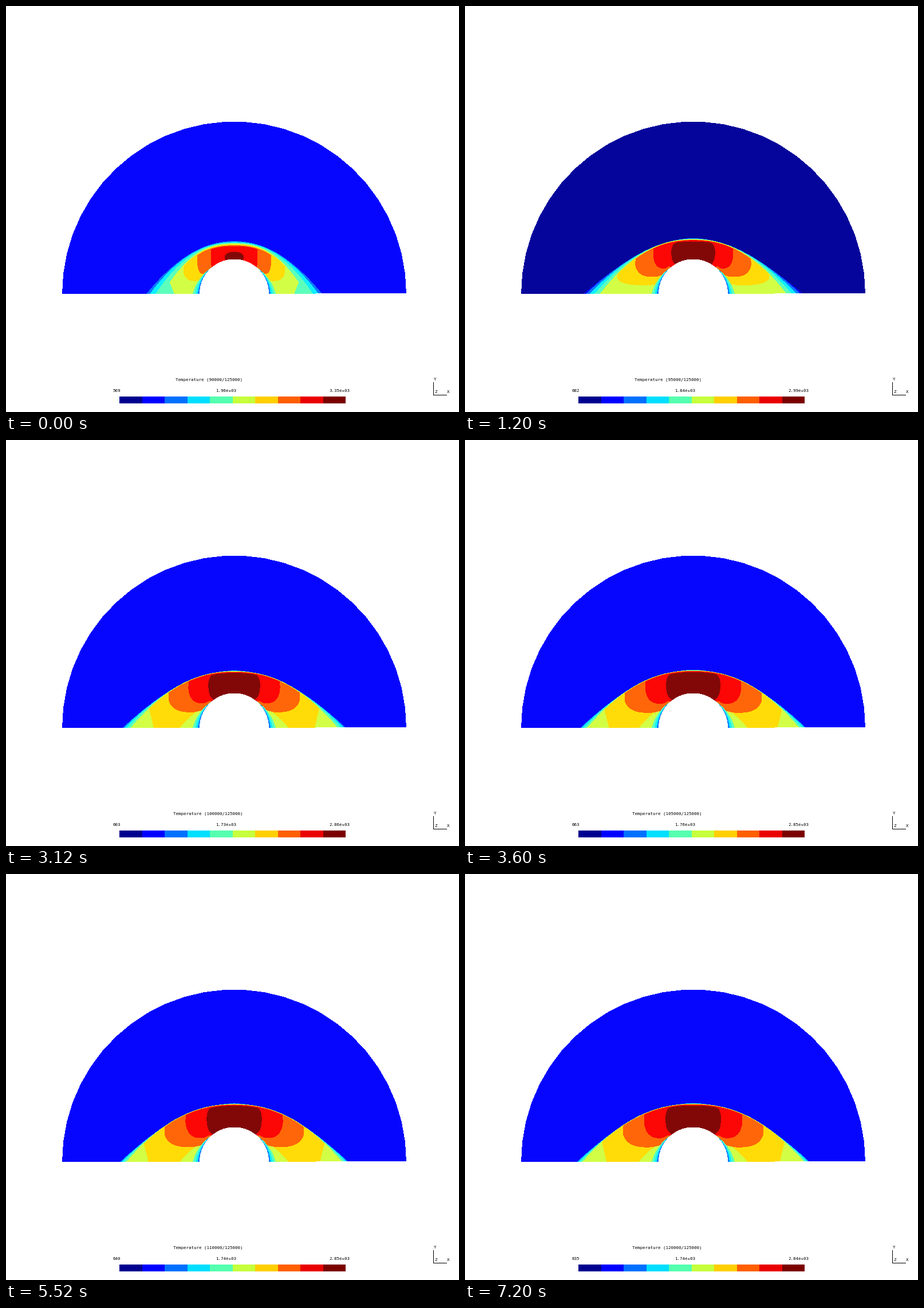
Recreate the animation shown at these times as a matplotlib script. Size 791 px wide and 708 px high, loop 8 s.

```python
import numpy as np
import matplotlib.pyplot as plt
from matplotlib.animation import FuncAnimation
from matplotlib.patches import Polygon, Rectangle

W, H, DPI = 791, 708, 100
CX, BASE = 398.5, 502
R_OUT, R_BODY = 300, 60

BAR = ["#00008f", "#0000ff", "#0070ff", "#00dfff", "#55ffaf",
       "#c6ff3c", "#ffcf00", "#ff5f00", "#ea0000", "#7a0000"]
LIT = ["#05059b", "#0606ff", "#0c78ff", "#0eeeff", "#5cffbc",
       "#d2ff46", "#ffdc08", "#ff6609", "#fc0606", "#820808"]
GREEN, YELLOW, RED, DARK = 5, 6, 8, 9

# Coldest and hottest value of each step, in kelvin
RANGES = [(569, 3350), (682, 2990), (603, 2860), (663, 2850),
          (640, 2850), (643, 2840), (635, 2840)]
AMBIENT = 900   # temperature of the undisturbed flow
GROUND = 2000   # colours below this reach the base line

# Lower side of a lobe, from its tip (0, 0) towards the wall
LOBE = [(0, 0), (0, .42), (.12, .78), (.34, .97), (.64, 1), (.88, .88)]

fig = plt.figure(figsize=(W / DPI, H / DPI), dpi=DPI, facecolor="white")
ax = fig.add_axes([0, 0, 1, 1])
ax.set_xlim(0, W)
ax.set_ylim(H, 0)
ax.axis("off")


def arc(radius, degrees):
    """Points at the given angles, x measured from the axis."""
    t = np.radians(degrees)
    return np.column_stack([radius * np.cos(t), BASE - radius * np.sin(t)])


def spline(points, n=8):
    """Catmull-Rom curve through the points."""
    p = np.array([points[0], *points, points[-1]], float)
    t = np.linspace(0, 1, n)[:, None]
    parts = []
    for a, b, c, d in zip(p, p[1:], p[2:], p[3:]):
        parts.append(b + .5 * t * (c - a + t * (2 * a - 5 * b + 4 * c - d
                                                + t * (3 * (b - c) + d - a))))
    return np.vstack(parts)


def fill(points, color, z):
    return ax.add_patch(Polygon(np.array(points) + (CX, 0), closed=True, fc=color,
                                lw=0, antialiased=False, zorder=z))


def mirror(half):
    return np.vstack([half, half[::-1] * (-1, 1)])


class Stage:
    """Right half of the temperature field at one step, settling over time."""

    def __init__(self, i):
        self.lo, self.hi = RANGES[i]
        self.first = int((AMBIENT - self.lo) / (self.hi - self.lo) * 10) + 1

        def settle(end, start, rate):
            return end + (start - end) * np.exp(-rate * i)

        self.width = 2 * i + settle(190.5, 152.5, 3)
        self.top = settle(400, 410.5, .72)
        self.spread = settle(2, 6, .65)
        self.rise = settle(.4, 1.45, 2)
        self.power = settle(1.8, 2.05, 2)
        self.core_drop = settle(1.3, 8.3, 3)
        self.core_round = settle(8, 16, 3)
        self.core_width = settle(48, 16, 1.15)
        self.step = settle(37, 24, .8)
        self.red_depth = settle(460, 454, .7)
        self.depth_step = settle(16, 12.5, 1)

    def limit(self, k):
        """Half width of colour k along the base line."""
        n = min(k, GREEN) - self.first
        return self.width - self.spread * n ** 1.4 - max(0, k - GREEN)

    def front(self, k, x):
        """Height of the front of colour k at x."""
        u = np.clip(x / self.limit(k), 0, 1)
        top = self.top + self.rise * (k - self.first)
        if k == DARK:
            top += self.core_drop
        return BASE - (BASE - top) * (1 - u ** (self.power + .13 * (min(k, GREEN) - 2)))

    def crest(self, k, end):
        x = np.linspace(0, end, 90)
        return np.column_stack([x, self.front(k, x)])

    def tip(self, k):
        return self.core_width + self.step * (DARK - k)

    def grounded(self, k):
        return self.lo + (self.hi - self.lo) * k / 10 < GROUND

    def foot(self, k):
        limit, tip = self.limit(k), self.tip(k)
        if k < GREEN or tip >= limit:
            return self.crest(k, limit)
        return np.vstack([self.crest(k, tip), [(tip - 8, BASE)]])

    def lobe(self, k):
        crest = self.crest(k, self.tip(k))
        x, y = crest[-1]
        depth = self.red_depth + self.depth_step * (RED - k)
        wall = arc(R_BODY - 1, [25 + 12.5 * (k - YELLOW)])[0]
        side = [(x + a * (wall[0] - x), y + b * (depth - y)) for a, b in LOBE]
        return np.vstack([crest, spline(side + [wall]), [(0, BASE)]])

    def core(self):
        w, r = self.core_width, self.core_round
        crest = self.crest(DARK, w - r)
        y = crest[-1, 1]
        mid = (y + 445) / 2
        side = spline([crest[-1], (w - .35 * r, y + .25 * (mid - y)), (w, mid),
                       (w - 3, 445), (w - 13, 456)])
        return np.vstack([crest, side, [(0, 456)]])

    def shapes(self):
        for k in range(self.first, DARK):
            yield k, mirror(self.foot(k) if self.grounded(k) else self.lobe(k))
            if k == YELLOW and self.grounded(k):
                yield from wall_layer(GREEN, 34, 2)
        yield DARK, mirror(self.core())
        for k, width in ((4, 12), (3, 7), (2, 2.8)):
            yield from wall_layer(k, width, 1.5)


def wall_layer(k, width, power, reach=52):
    """Cool wedge on both sides of the body, thinning out upwards."""
    a = np.linspace(0, reach, 40)
    wedge = np.vstack([arc(R_BODY + width * (1 - a / reach) ** power, a),
                       arc(R_BODY - 2, a[::-1])])
    for side in (-1, 1):
        yield k, wedge * (side, 1)


def text(x, y, s="", ha="right"):
    return ax.text(x, y, s, ha=ha, va="baseline", family="DejaVu Sans Mono",
                   size=7.45 * 72 / DPI, color="black", zorder=60)


stages = [Stage(i) for i in range(len(RANGES))]
dome = fill(arc(R_OUT, np.linspace(0, 180, 28)), LIT[1], 1)
groups = [[fill(pts, LIT[k], 2 + n) for n, (k, pts) in enumerate(stage.shapes())]
          for stage in stages]
fill(arc(R_BODY, np.linspace(0, 180, 55)), "white", 50)
# The base line steps up by one pixel on the right
ax.add_patch(Rectangle((541, 501), W - 541, 4, fc="white", lw=0, zorder=50))

for n, color in enumerate(BAR):
    ax.add_patch(Rectangle((198 + 39.5 * n, 681), 39.5, 12, fc=color, lw=0,
                           antialiased=False, zorder=50))
ax.plot([746, 746, 769], [656, 677.5, 677.5], color="black", lw=.72,
        antialiased=False, zorder=50)
for x, y, s in ((749.6, 653.4, "Y"), (772.4, 675, "X"), (750.5, 675, "Z")):
    text(x, y, s, "center")

title = text(413, 653.8)
marks = [text(x, 672.9) for x in (199.6, 402.2, 600)]


def draw(frame):
    step = frame // 3
    for i, group in enumerate(groups):
        for patch in group:
            patch.set_visible(i == step)
    stage = stages[step]
    dome.set_facecolor(LIT[stage.first - 1])
    title.set_text(f"Temperature ({90000 + 5000 * step}/125000)")
    for mark, value in zip(marks, (stage.lo, (stage.lo + stage.hi) / 2, stage.hi)):
        mark.set_text(f"{value:.3g}")
    return []


anim = FuncAnimation(fig, draw, frames=20, interval=400, repeat=True,
                     repeat_delay=0, blit=False)
plt.show()
```
